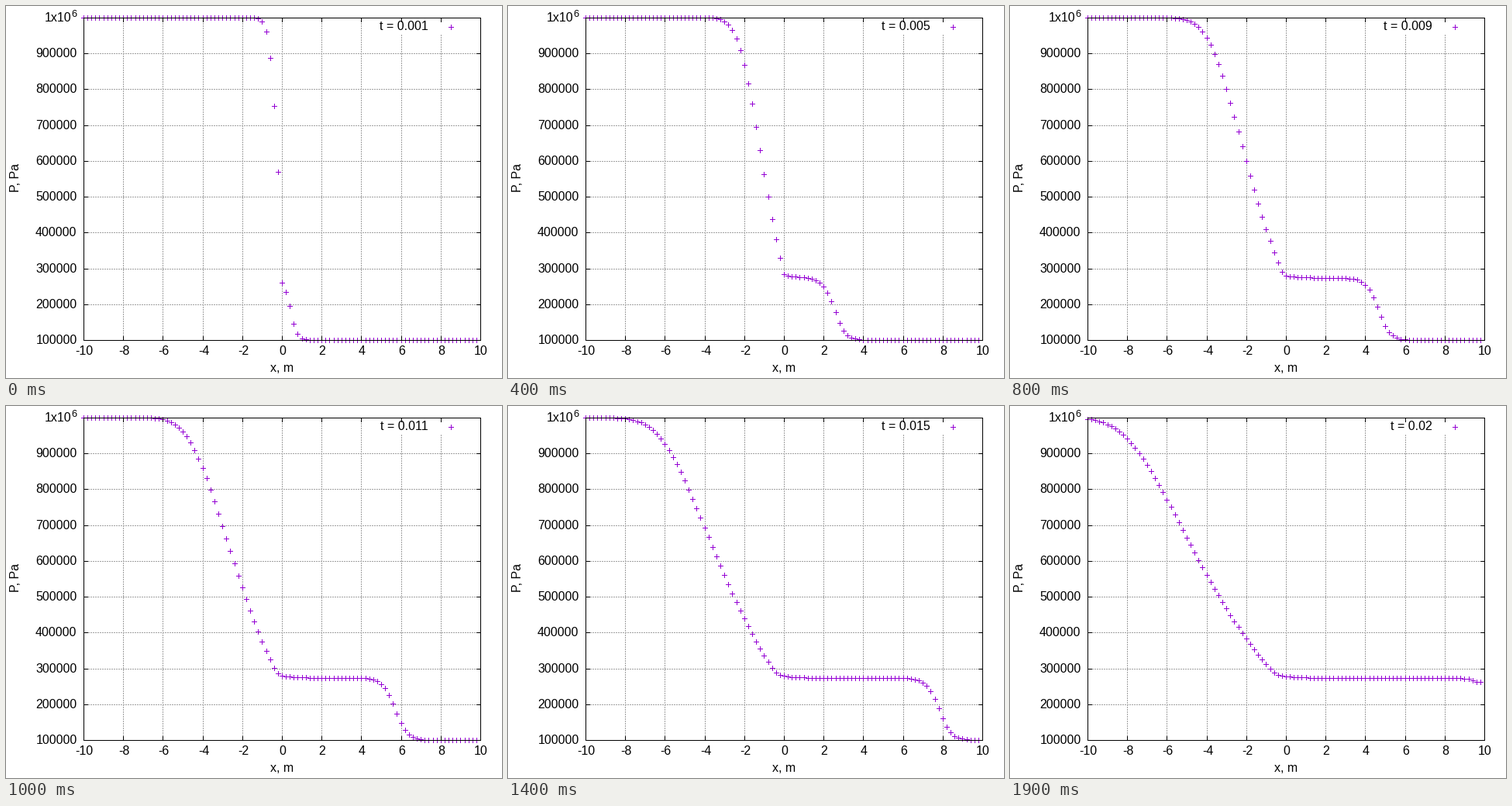
Write a matplotlib script that moves like this. It is 640 px wide and 480 px high and loops after 2 s.

```python
import math

import matplotlib.pyplot as plt
import numpy as np
from matplotlib.animation import FuncAnimation
from matplotlib.collections import LineCollection

W, H, DPI = 640, 480, 100
PX = 72 / DPI                                  # one pixel in points
LEFT, RIGHT, TOP, BOTTOM = 100, 612, 15, 431   # plot border
FRAMES, STEP_MS = 20, 100
PURPLE, GRID = "#9400d3", "#a0a0a0"
X = -10 + 0.2 * np.arange(100)

plt.rcParams["font.family"] = "Liberation Sans"
erfc = np.vectorize(math.erfc)

fig = plt.figure(figsize=(W / DPI, H / DPI), dpi=DPI, facecolor="white")
ax = fig.add_axes([0, 0, 1, 1])
ax.set_xlim(0, W)
ax.set_ylim(H, 0)
ax.axis("off")


def col(x):
    return np.floor(LEFT + (np.asarray(x) + 10) * 25.6 + 0.5)


def row(p):
    return BOTTOM - (p - 0.1) / 0.9 * (BOTTOM - TOP)


def hline(x0, x1, y):
    return [(x0, y + 0.5), (x1 + 1, y + 0.5)]


def vline(x, y0, y1):
    return [(x + 0.5, y0), (x + 0.5, y1 + 1)]


def add_lines(segs, color, z, style="solid"):
    # coordinates already sit on pixel centres, so snapping stays off
    lines = LineCollection(segs, colors=color, linewidths=PX, linestyles=style,
                           antialiaseds=False, zorder=z, snap=False)
    ax.add_collection(lines, autolim=False)
    return lines


def label(x, y, s, ha="center", size=16, va="baseline", **kw):
    return ax.text(x, y, s, fontsize=size * PX, ha=ha, va=va,
                   color="black", zorder=5, **kw)


def wave(t):
    """Pixel heights of the pressure points at t milliseconds."""
    # expansion fan running left, rounded at its head
    head = 0.48 * (1 - math.exp(-t / 0.52)) - 0.3393 * t
    z = 2.223 / math.sqrt(t + 0.44 / t) * (np.minimum(X, 0) - head)
    amp = 0.1845 * math.sqrt(20 / t) * (1 + 0.1 / t)
    fan = row((1 - amp * np.exp(-z * z) / erfc(z) / 6) ** 7)

    # plateau and shock front running right
    s = X - (0.5275 * t - 0.095)
    k = np.where(s < 0, 2.95 + 2.25 / t, 3.15 + 2.95 / t)
    bump = (1.2 + 17 / t) * (1 - math.exp(-(t / 2.5) ** 3))
    height = 80.2 + bump * np.exp(-np.maximum(X, 0) / 0.55)
    shock = BOTTOM - height / (1 + np.exp(k * s))

    soft = -4 * np.logaddexp(-fan / 4, -shock / 4)
    y = np.where(X < -0.1, soft, shock)
    y = np.maximum(y, TOP)
    y[0], y[-1] = y[1], y[-2]
    return np.floor(y + 0.5)


def crosses(xs, ys):
    segs = []
    for x, y in zip(xs, ys):
        segs += [hline(x - 3, x + 3, y), vline(x, y - 3, y + 3)]
    return segs


x_ticks = [(v, int(col(v))) for v in range(-10, 11, 2)]
y_ticks = [(v, int(row(v / 10) + 0.5)) for v in range(1, 11)]

grid, ticks = [], []
for v, x in x_ticks:
    ticks += [vline(x, TOP, TOP + 5), vline(x, BOTTOM - 5, BOTTOM)]
    if LEFT < x < RIGHT:
        top = 36 if 470 < x < 603 else TOP     # keep the key clear
        grid.append(vline(x, top, BOTTOM)[::-1])
    label(x + 1, 450, str(v))
for v, y in y_ticks:
    ticks += [hline(LEFT, LEFT + 5, y), hline(RIGHT - 5, RIGHT, y)]
    if TOP < y < BOTTOM:
        grid.append(hline(LEFT, RIGHT, y))
    if v < 10:
        label(91.5, y + 5, f"{v}00000", "right")
label(84.4, 20, "1x10", "right")
label(91.5, 14, "6", "right", 12.8)
label(356, 472, "x, m")
label(20, 222, "P, Pa", "right", va="center", rotation=90)

border = [hline(LEFT, RIGHT, TOP), hline(LEFT, RIGHT, BOTTOM),
          vline(LEFT, TOP, BOTTOM), vline(RIGHT, TOP, BOTTOM)]
add_lines(grid, GRID, 1, (0, (2, 2)))
add_lines(border + ticks, "black", 4)
add_lines(crosses([574], [27]), PURPLE, 3)
points = add_lines([], PURPLE, 3)
key = label(545, 31, "", "right")


def draw(i):
    t = i + 1
    points.set_segments(crosses(col(X), wave(t)))
    key.set_text(f"t = {t / 1000:g}")
    return points, key


anim = FuncAnimation(fig, draw, frames=FRAMES, interval=STEP_MS,
                     repeat=True, repeat_delay=0, blit=False)
plt.show()
```
